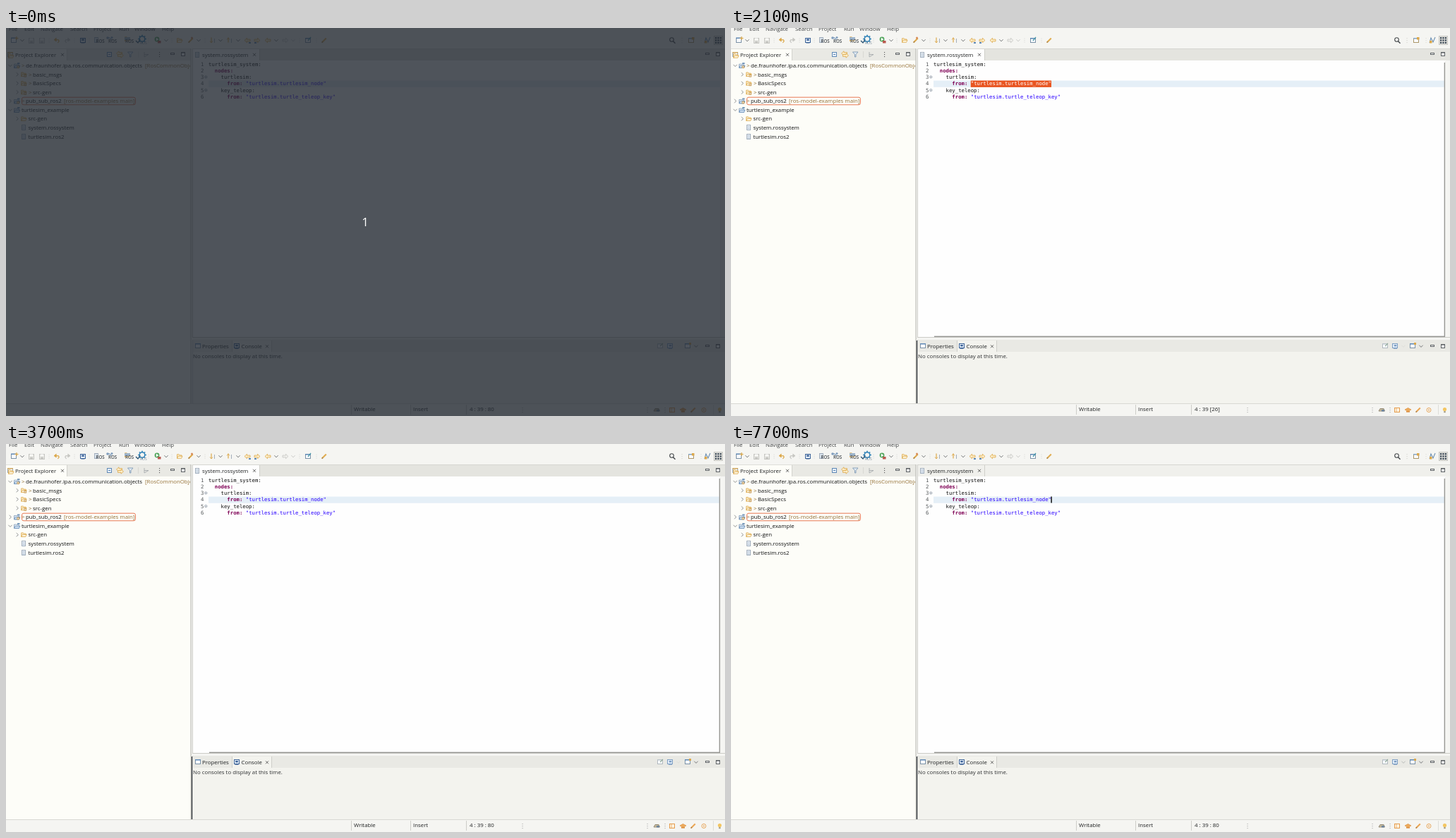
Write an HTML page with a canvas that moves like this. It is 1019 px wide and 550 px high and loops after 8 s.

```html
<!DOCTYPE html>
<html lang="en">
<head>
<meta charset="utf-8">
<title>Modelling editor</title>
<style>
html, body { margin: 0; width: 100%; height: 100%; overflow: hidden; background: #f5f5f2; }
canvas { display: block; }
</style>
</head>
<body>
<canvas id="stage" width="1019" height="550"></canvas>
<script>
const ctx = document.getElementById('stage').getContext('2d');
const LOOP = 8000;
const UI = '500 7.85px "Open Sans", "Noto Sans", sans-serif';
const MONO = '7.3px "DejaVu Sans Mono", monospace';
const CHAR = 4.395, LEFT = 287, LINE = 9.33;
const INK = '#1f2122', GRAY = '#c6c6c2', GOLD = '#dca84a', BLUE = '#5e88b5', ORANGE = '#e95420';
const STRIP = '#e9e9e4';

function rect(x, y, w, h, color) {
  ctx.fillStyle = color;
  ctx.fillRect(x, y, w, h);
}
function frame(x, y, w, h, color, fill) {
  if (fill) rect(x, y, w, h, fill);
  ctx.strokeStyle = color;
  ctx.lineWidth = 1;
  ctx.strokeRect(x + .5, y + .5, w - 1, h - 1);
}
function path(points, color, width = 1, fill) {
  ctx.beginPath();
  points.forEach(([x, y]) => ctx.lineTo(x, y));
  if (fill) {
    ctx.closePath();
    ctx.fillStyle = fill;
    ctx.fill();
  }
  ctx.strokeStyle = color;
  ctx.lineWidth = width;
  ctx.stroke();
}
function disc(x, y, r, color, ring) {
  ctx.beginPath();
  ctx.arc(x, y, r, 0, Math.PI * 2);
  if (ring) {
    ctx.strokeStyle = color;
    ctx.lineWidth = ring;
    ctx.stroke();
  } else {
    ctx.fillStyle = color;
    ctx.fill();
  }
}
function text(s, x, y, color = INK, font = UI) {
  ctx.font = font;
  ctx.fillStyle = color;
  ctx.fillText(s, x, y);
}

// Icons, all placed by their centre.
function chevron(x, y, color = '#6a6d6f', right = false) {
  path(right ? [[x - 1.3, y - 2.6], [x + 1.4, y], [x - 1.3, y + 2.6]]
             : [[x - 2.6, y - 1.3], [x, y + 1.4], [x + 2.6, y - 1.3]], color, .9);
}
function cross(x, y) {
  path([[x - 2, y - 2], [x + 2, y + 2]], '#555', .9);
  path([[x + 2, y - 2], [x - 2, y + 2]], '#555', .9);
}
function folder(x, y, color = GOLD) {
  path([[x - 3.5, y + 2.8], [x - 3.5, y - 2.8], [x - .8, y - 2.8], [x, y - 1.6], [x + 3, y - 1.6], [x + 3, y]], color, .8, '#fbedca');
  path([[x - 3.5, y + 2.8], [x - 2, y - .3], [x + 4, y - .3], [x + 2.6, y + 2.8]], color, .8, '#fdf6e0');
}
function project(x, y) {
  path([[x - 4, y + 3.3], [x - 4, y - 2], [x - .5, y - 2], [x + 3, y - 1], [x + 3, y + 3.3]], '#7f9ab6', .8, '#e8f0f8');
  path([[x - 4, y + 3.3], [x - 2.5, y + .2], [x + 4.4, y + .2], [x + 3, y + 3.3]], BLUE, .8, '#d4e4f4');
  rect(x + .5, y - 4, 3.5, 2, '#7296bb');
}
function badge(x, y) {
  rect(x, y, 3.5, 3.5, '#c79a52');
  rect(x + 1, y + 1, 1.5, 1.5, '#fff');
}
function page(x, y) {
  frame(x - 3, Math.round(y - 4), 6, 8, '#a3afbd', '#f6f9fc');
  for (let i = -2; i < 3; i += 1.6) rect(x - 1.6, y + i, 3.2, .6, '#8ea6c0');
}
function monitor(x, y, color = '#3d6398') {
  frame(x - 4 | 0, Math.round(y - 4), 8, 7, color, '#e8f1fb');
  rect(x - 1.8, y - 2, 3.6, 2.4, color);
  rect(x - 2.5, y + 3.2, 5, .8, color);
}
function panel(x, y, color = '#7b91a6', top = BLUE) {
  frame(x - 4, y - 3.5 | 0, 8, 7, color, '#fafcff');
  rect(x - 4, y - 4, 8, 1.5, top);
}
function disk(x, y) {
  frame(x - 4, Math.round(y - 4), 8, 8, GRAY, '#ebebe7');
  rect(x - 2, y - 3, 4, 2.4, '#fafaf8');
  rect(x - 2, y + 1, 4, 2.5, GRAY);
}
function arrow(x, y, dir, color = GOLD, fill = '#fcedc8') {
  path([[-4, 0], [-.5, -3.2], [-.5, -1.4], [4, -1.4], [4, 1.4], [-.5, 1.4], [-.5, 3.2], [-4, 0]]
    .map(([a, b]) => [x - a * dir, y + b]), color, .8, fill);
}
function curl(x, y, dir, color) {
  path([[x - 4 * dir, y - .8], [x - .8 * dir, y - 3.4], [x - .8 * dir, y + 1.6], [x - 4 * dir, y - .8]], color, .7, color);
  path([[x - dir, y - .8], [x + 2.4 * dir, y - .6], [x + 3.2 * dir, y + 1.2], [x + 1.4 * dir, y + 3.5]], color, 1.2);
}
function pencil(x, y, color = GOLD) {
  path([[x - 3.2, y + 3], [x + 2.8, y - 3]], color, 2);
  path([[x - 3.4, y + 3.2], [x - 1.8, y + 1.6]], '#9a7d55', 1.1);
}
function step(x, y, up) {
  path([[x - 2, y - 4], [x - 2, y + 3]], GOLD, 1.2);
  const tip = up ? -3.5 : 3.5;
  path([[x - 4, y + tip * .3], [x - 2, y + tip], [x, y + tip * .3]], GOLD, .9);
  path([[x + 2.5, y - 2.5], [x + 2.5, y + 3.5]], '#a3aebb', 1);
}
function dots(x, y, color = '#8c8c88', gap = 3) {
  for (let i = -1; i < 2; i++) rect(x - .5, y + i * gap - .5, 1.1, 1.1, color);
}
function minMax(x, y) {
  frame(x - 3, y - 2, 6, 3, '#5d6164', '#fff');
  frame(x + 12, y - 3, 6, 6, '#5d6164', '#fff');
  rect(x + 12, y - 3, 6, 1.6, '#5d6164');
}

function drawToolbar() {
  rect(0, 0, 1019, 29, '#f5f5f2');
  [['File', 4], ['Edit', 26], ['Navigate', 49], ['Search', 91], ['Project', 124], ['Run', 160], ['Window', 182], ['Help', 221]]
    .forEach(([s, x]) => text(s, x, 4, '#3c3e40'));
  const y = 17.5;
  [61, 97, 118, 202, 235, 282, 416, 440].forEach(x => dots(x, y, '#dcdcd7', 2.5));
  panel(11, y);
  path([[15, 12], [15, 17]], GOLD, 1.2);
  path([[12.5, 14.5], [17.5, 14.5]], GOLD, 1.2);
  disk(36, y);
  disk(51, y);
  curl(72, y, 1, GOLD);
  curl(87, y, -1, GRAY);
  monitor(109, y);
  const label = '600 6.2px "Open Sans", sans-serif';
  page(128, 16.5);
  text('ROS', 127.5, 21, '#44494e', label);
  path([[143, 14], [147, 14], [150, 17]], BLUE, 1);
  disc(144, 14, 1.8, '#7f9cbc');
  disc(150, 13.5, 1.5, '#7f9cbc');
  text('ROS', 145, 21, '#44494e', label);
  folder(172, 15.5);
  rect(168, 13, 8, 4, '#9db4cb');
  text('ROS', 169, 21, '#44494e', label);
  disc(193, 15.5, 3.8, '#2f82b8', 1.6);
  for (let i = 0; i < 8; i++) {
    const a = i * Math.PI / 4;
    disc(193 + 5 * Math.cos(a), 15.5 + 5 * Math.sin(a), .9, '#2f82b8');
  }
  path([[184, 18], [187, 21], [190, 16]], '#27506f', 1.3);
  text('ROS', 190, 23, '#7d8d9a', '5px "Open Sans", sans-serif');
  disc(214, 16, 3.4, '#4fa45a');
  path([[213, 14], [216, 16], [213, 18]], '#fff', .6, '#fff');
  rect(215, 18, 4.5, 3.5, '#b95a4f');
  folder(246, y);
  pencil(262, y);
  disc(263.5, 14, 1.5, '#d98b58');
  step(293, y, false);
  step(317, y, true);
  arrow(342, y, -1);
  rect(344, 20, 3, 2, BLUE);
  arrow(356, y, 1);
  rect(352, 20, 3, 2, BLUE);
  arrow(371, y, -1);
  arrow(396, y, 1, GRAY, '#f0f0ed');
  [23, 227, 273, 304, 329, 383].forEach(x => chevron(x, y));
  chevron(407, y, '#c6c6c2');
  panel(428, 18);
  path([[428, 18], [432, 13]], '#4a9aa9', 1.3);
  pencil(451, y, '#e0ac50');
  disc(943.5, 16.5, 2.8, '#44484b', 1.1);
  path([[945.5, 18.8], [948.5, 21.8]], '#44484b', 1.4);
  dots(958, y, '#d2d2cd');
  panel(971, 18, '#ab9668', '#85a6c5');
  rect(972, 13, 3.5, 3.5, GOLD);
  dots(985, y, '#dcdcd7');
  path([[990, 21], [992, 14], [995, 20], [998, 13]], '#6c8fb2', 1.1);
  rect(990, 18, 3.5, 3.5, GOLD);
  frame(1003, 11, 13, 13, '#c8c8c3', '#e0e0dc');
  for (let i = 0; i < 9; i++) rect(1005 + i % 3 * 3.4, 13 + (i / 3 | 0) * 3.4, 2.2, 2.2, '#3d4a57');
}

function drawExplorer() {
  rect(0, 29, 262, 504, '#fdfdf8');
  rect(87, 29, 175, 17, STRIP);
  rect(0, 29, 262, 1, '#deded9');
  rect(86, 30, 1, 16, '#d3d3ce');
  rect(261.5, 29, 1.2, 504, '#b9b9b4');
  panel(6, 38, '#94a3b2', '#cfa65c');
  folder(7, 39.5);
  text('Project Explorer', 13, 40.5);
  cross(80, 37.8);
  frame(143, 34, 7, 7, BLUE, '#eaf2fb');
  rect(145, 37, 3, 1, BLUE);
  arrow(160.5, 36, -1);
  arrow(162.5, 39, 1);
  path([[172.5, 34], [180, 34], [177, 37.5], [177, 41], [175.5, 41], [175.5, 37.5], [172.5, 34]], '#7390ad', .8, '#e4edf6');
  rect(187, 33, 1, 9, '#d8d8d3');
  path([[196, 34], [196, 41], [202, 37.5], [196, 37.5]], '#a8acae', .9);
  dots(217.5, 37.5, '#555');
  minMax(236, 37);

  const rows = [
    ['de.fraunhofer.ipa.ros.communication.objects', 0, 'open', '>'],
    ['basic_msgs', 1, 'shut', '>'],
    ['BasicSpecs', 1, 'shut', '>'],
    ['src-gen', 1, 'shut', '>'],
    ['pub_sub_ros2', 0, 'shut', '>'],
    ['turtlesim_example', 0, 'open'],
    ['src-gen', 1, 'shut'],
    ['system.rossystem', 1],
    ['turtlesim.ros2', 1]
  ];
  ctx.save();
  ctx.beginPath();
  ctx.rect(0, 46, 261, 480);
  ctx.clip();
  rows.forEach(([name, depth, state, mark], i) => {
    const y = 53.2 + i * 12.58, x = depth * 10;
    if (state) chevron(6 + x, y, '#85888a', state === 'shut');
    if (!state) page(25, y);
    else if (depth) folder(25.2, y);
    else project(15.5, y);
    if (mark) {
      badge(x + 15.5, y + .3);
      text('>', 22 + x, y + 2.8, '#8d6c31');
    }
    text(name, (mark ? 28 : 22) + x - (depth && !mark ? .5 : 0), y + 2.8, '#111213');
  });
  text('[RosCommonObjects', 197, 56, '#957138');
  text('[ros-model-examples main]', 82, 106.3, '#957138');
  ctx.beginPath();
  ctx.roundRect(22.5, 98.2, 161, 10.6, 2.5);
  ctx.strokeStyle = '#e87955';
  ctx.lineWidth = 1;
  ctx.stroke();
  ctx.restore();
}

const CODE = [
  [[0, 'turtlesim_system:']],
  [[2, 'nodes:', 'key']],
  [[4, 'turtlesim:']],
  [[6, 'from:', 'key'], [12, '"turtlesim.turtlesim_node"', 'string']],
  [[4, 'key_teleop:']],
  [[6, 'from:', 'key'], [12, '"turtlesim.turtle_teleop_key"', 'string']]
];

function drawEditor(state) {
  rect(262.7, 29, 757, 414, '#f5f5f2');
  rect(264, 29, 755, 17, state.focused ? '#f0f0ec' : '#e4e4df');
  rect(264, 29, 755, 1, '#d6d6d1');
  rect(264, 29, 1, 410, '#cfcfca');
  rect(265, 46, 748, 392, '#fefefe');
  rect(265, 30, 94, 16, state.focused ? '#f0f0ec' : '#fefefe');
  rect(359, 30, 1, 16, '#cfcfca');
  rect(1012, 47, 1, 391, '#ededea');
  rect(264, 438, 755, 1, '#cbcbc6');
  page(271, 38);
  text('system.rossystem', 278, 40.6);
  cross(352, 37.8);
  minMax(994, 37);

  rect(LEFT, 46.6 + state.line * LINE, 725, 9.2, '#e5eff7');
  CODE.forEach((parts, i) => {
    const y = 53.5 + i * LINE;
    text(String(i + 1), 276, y, '#55585a', MONO);
    if (i === 2 || i === 4) {
      disc(283.3, y - 2.7, 1.7, '#8a96a2', .7);
      rect(282.2, y - 3, 2.2, .7, '#8a96a2');
    }
    parts.forEach(([column, s, kind]) => {
      const x = LEFT + column * CHAR;
      const selected = state.selected && kind === 'string' && i === state.line;
      if (selected) rect(x, y - 7, s.length * CHAR, 9.4, ORANGE);
      const color = selected ? '#fff' : { key: '#7f0055', string: '#2a00ff' }[kind] || '#111';
      text(s, x, y, color, (kind === 'key' ? 'bold ' : '') + MONO);
    });
  });
  if (state.caret) rect(453.4, 74.5, 1.4, 9, '#000');

  ctx.globalAlpha = state.bars;
  rect(1010.7, 49, 1.3, 389, '#969693');
  rect(288, 436.6, 724, 1.4, '#969693');
  ctx.globalAlpha = 1;
}

function drawConsole(state) {
  rect(264, 442, 755, 91, '#f3f3ee');
  rect(264, 442, 755, 17, STRIP);
  rect(321, 443, 55, 17, '#f3f3ee');
  rect(264, 442, 1, 90, '#cfcfca');
  rect(320, 443, 1, 16, '#cfcfca');
  rect(376, 443, 1, 16, '#cfcfca');
  panel(272, 451);
  text('Properties', 278, 454);
  monitor(327, 451);
  text('Console', 333.5, 454);
  cross(370, 451.3);
  panel(927, 451, '#b0b8be', '#bcc4cb');
  path([[927, 451], [931, 447]], '#8fa997', 1.1);
  monitor(941.5, 451, '#7d9ec3');
  chevron(953, 451, state.focused ? '#b4b6b5' : '#dcdcd7');
  panel(966, 451);
  rect(968, 446, 3, 3, GOLD);
  chevron(978, 451);
  minMax(994, 451);
  text('No consoles to display at this time.', 265, 467.5, '#2f3133');
}

function drawStatus(state) {
  rect(0, 532, 1019, 18, '#f5f5f2');
  rect(0, 532, 1019, 1, '#d8d8d3');
  [489, 573, 652].forEach(x => rect(x, 534, 1, 14, '#cdcdc8'));
  text('Writable', 493, 543.3);
  text('Insert', 577, 543.3);
  text(state.status, 657, 543.3);
  [732, 909, 934].forEach(x => dots(x, 541.5, '#aaa'));
  path([[918, 543], [920, 539.5], [925, 539.5], [926.5, 543]], '#948b78', 1, '#c8bb9a');
  rect(922, 541, 4, 2.5, '#6c849d');
  frame(940, 538, 8, 7, '#e59d4e', '#fdf3e0');
  path([[943, 538], [943, 545]], '#e59d4e', .7);
  path([[955, 541], [959.5, 538.5], [964, 541], [959.5, 543.5]], '#dd9142', .7, '#ecab5c');
  rect(957, 543, 5, 1.7, '#dd9142');
  pencil(974, 541.5, '#eba655');
  disc(989, 541.5, 3, '#e8a65b', 1);
  disc(989, 541.5, 1, '#e8a65b');
  rect(1002, 534, 1, 14, '#deded9');
  disc(1011.5, 540.5, 2.6, '#f3c662');
  rect(1010.3, 543.2, 2.4, 2, '#9a927c');
}

function drawCountdown() {
  rect(0, 0, 1019, 550, 'rgba(36,42,50,.8)');
  ctx.textAlign = 'center';
  text('1', 509, 281.3, '#fff', '500 17px "Open Sans", sans-serif');
  ctx.textAlign = 'left';
}

// Latest value whose start time has passed.
function at(t, steps) {
  return steps.reduce((value, [start, next]) => t >= start ? next : value, steps[0][1]);
}

function stateAt(t) {
  const second = t >= 2500 && t < 2900;
  const selected = t >= 2100 && t < 2900;
  return {
    selected,
    line: second ? 5 : 3,
    status: second ? '6 : 42 [29]' : selected ? '4 : 39 [26]' : '4 : 39 : 80',
    focused: t >= 6700,
    caret: t >= 6700 && t < 7100 || t >= 7700,
    bars: at(t, [[0, 0], [1200, .25], [1400, .5], [1500, .75], [1600, 1],
      [5700, .85], [5800, .6], [6000, .75], [6100, .9], [6200, 1]])
  };
}

function render(now) {
  const t = now % LOOP;
  const state = stateAt(t);
  drawToolbar();
  drawExplorer();
  drawEditor(state);
  drawConsole(state);
  drawStatus(state);
  if (t < 100) drawCountdown();
}

let start;
function tick(now) {
  start ??= now;
  render(Math.max(0, now - start));
  requestAnimationFrame(tick);
}
requestAnimationFrame(tick);
</script>
</body>
</html>
```
